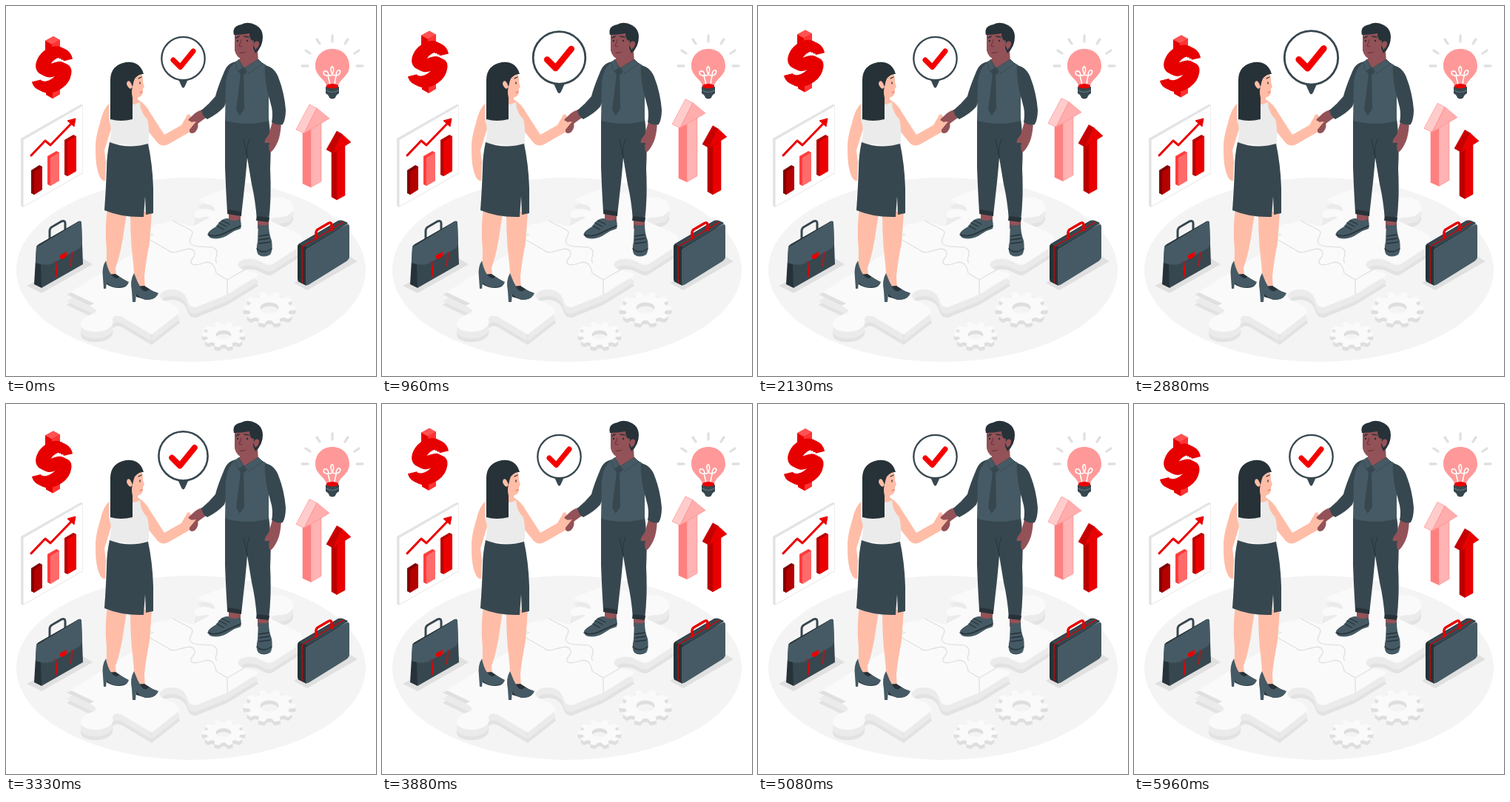
Recreate the animation shown at these times as an HTML page. Size 500 px wide and 500 px high, loop 6000 ms.

```html
<!DOCTYPE html>
<html lang="en">
<head>
<meta charset="utf-8">
<title>Business deal</title>
<style>
  html, body { margin: 0; width: 100%; height: 100%; overflow: hidden; background: #fff; }
  svg { display: block; width: 100vw; height: 100vh; }
  .line { fill: none; stroke-linecap: round; stroke-linejoin: round; }
  .dark { fill: #263238; }
  .slate { fill: #37474f; }
  .steel { fill: #455a64; }
  .skin { fill: #ffbda7; }
  .brown { fill: #935257; }
  .top { fill: #fafafa; }
  .side { fill: #e2e2e2; }
  .shade { fill: #e0e0e0; }
</style>
</head>
<body>
<svg viewBox="0 0 500 500">
  <defs>
    <path id="puzzle" d="M82 390 L128 361 L165 338 L180 328 L191 314 L200 309
      C190 303 197 293 209 294 C219 296 216 290 225 290 L252 298 L275 286
      C268 282 262 290 256 285 C251 276 266 271 277 276 C286 280 283 269 272 268 L258 262
      L299 246 L345 256 C356 262 366 256 376 260 C391 263 393 279 378 284 C365 287 357 284 359 291
      L398 309 L402 322 L360 349 C351 353 345 343 333 342 C318 340 307 349 318 355 C326 360 338 357 341 364
      L299 390 L257 407 C243 407 248 396 239 388 C229 379 207 383 208 393 C211 402 230 399 235 414
      L197 444 L163 424 C155 417 144 417 144 424 C148 437 123 445 106 437 C94 429 106 419 117 416
      C126 413 121 409 113 405 Z"/>
  </defs>

  <ellipse cx="250" cy="356.5" rx="236" ry="124.5" fill="#f4f4f4"/>

  <g id="floor">
    <use href="#puzzle" y="14" class="side"/>
    <use href="#puzzle" y="9" fill="#ebebeb"/>
    <use href="#puzzle" class="top"/>
    <path class="shade" d="M82 390 L88 387 L119 402 L113 405Z"/>
    <g class="line" stroke="#e0e0e0" stroke-width="1.3">
      <path d="M191 314 L219 330 C225 336 233 331 243 329 C253 326 259 334 252 341 C245 350 255 352 268 347 C277 344 283 351 284 361 L299 370 V390"/>
      <path d="M225 290 L250 303 C256 308 246 314 249 320 C255 329 274 323 281 327 C291 333 279 343 285 347"/>
      <path d="M299 370 L330 352 M197 444 V456"/>
    </g>
    <g id="gears"></g>
  </g>

  <g id="chart">
    <path d="M20 179 L101 133 L104 134 V226 L23 272 L20 270Z" fill="#e3e3e3"/>
    <path d="M23.500 181 L103.500 135 V225.500 L23.500 271Z" fill="#fff" stroke="#ececec" stroke-width=".6"/>
    <path class="line" d="M34 202 L53 182 L60 188 L90 157" stroke="#eb0000" stroke-width="3"/>
    <path d="M83 155 L94 152 L92 163Z" fill="#eb0000" stroke="#eb0000" stroke-linejoin="round"/>
    <path d="M34 222 L45 215 L49 217 V248 L38 255 L34 253Z" fill="#800000"/>
    <path d="M38 224 L49 217 V248 L38 255Z" fill="#b30000"/>
    <path d="M56 203 L68 196 L72 198 V236 L60 243 L56 241Z" fill="#ff3d3d"/>
    <path d="M60 205 L72 198 V236 L60 243Z" fill="#ff6b6b"/>
    <path d="M79 181 L91 174 L95 176 V223 L83 230 L79 228Z" fill="#b80000"/>
    <path d="M83 183 L95 176 V223 L83 230Z" fill="#eb0000"/>
  </g>

  <g id="satchel">
    <path class="shade" d="M28 378 L48 388 L117 349 L102 340Z"/>
    <path class="line" d="M59 315 V304 Q59 300 63 298 L75 291 Q80 289 80 294 V304" stroke="#37474f" stroke-width="3"/>
    <path class="dark" d="M41 326 Q41 324 44 322 L98 291 L102 292 L49 330 L48 381 L38 376Z"/>
    <path class="slate" d="M46 326 Q47 324 50 322 L98 291 Q102 289 102 294 L104 349 L48 381Z"/>
    <path class="steel" d="M41 326 L98 292 Q102 290 102 294 L103 321 Q102 326 97 329 L63 348 Q53 352 40 347Z"/>
    <path class="line" d="M67 345 L69 366 M89 333 L88 351" stroke="#eb0000" stroke-width="1.8"/>
    <path d="M73 337 L82 332 V338 L77 342 L73 341Z" fill="#eb0000"/>
  </g>

  <g id="briefcase">
    <path class="shade" d="M389 374 L407 384 L475 345 L462 337Z"/>
    <path class="dark" d="M394 325 Q394 322 398 320 L449 290 Q452 289 455 290 L462 293 L408 333 L406 378 L396 373 Q394 372 394 369Z"/>
    <path class="slate" d="M396 322 L449 291 Q452 289 456 291 L462 294 L407 326Z"/>
    <path class="steel" d="M405 331 Q405 328 409 326 L459 296 Q464 293 464 298 V339 Q464 342 460 345 L410 376 Q405 379 405 375Z"/>
    <path class="line" d="M400 374 V328 Q400 325 404 323 L456 292" stroke="#e00000" stroke-width="1.3"/>
    <path class="line" d="M419 314 V306 Q419 303 423 301 L435 294 Q440 291 440 296 V303" stroke="#e60000" stroke-width="3.500"/>
  </g>

  <g id="woman">
    <path class="skin" d="M137 274 H164 L158 313 Q154 338 148 354 L149 366 L135 361 Q136 344 136 330 Q133 300 137 274Z"/>
    <path class="skin" d="M168 278 H197 L194 320 Q189 345 187 365 L188 384 L174 380 Q173 352 170 330 Q168 306 168 278Z"/>
    <path class="dark" d="M136 363 L148 362 L164 373 Q166 380 153 381 Q143 381 136 376Z"/>
    <path class="steel" d="M135 344 Q129 353 131 367 L132 382 H135 L136 374 Q145 382 153 380 Q165 379 166 373 L153 366 Q149 371 142 363 Q137 355 135 344Z"/>
    <path class="dark" d="M176 379 L187 378 L204 389 Q203 397 189 397 L176 393Z"/>
    <path class="steel" d="M173 361 Q167 371 170 385 L171 400 H175 L176 389 Q184 398 192 397 Q204 395 206 388 L193 383 Q188 389 182 381 Q177 372 173 361Z"/>
    <path class="skin" d="M140 131 Q131 139 127 158 Q120 180 121 195 Q121 218 126 229 Q129 237 134 236 L135 211 L133 195 L143 163Z"/>
    <path class="skin" d="M160 118 H178 V126 Q190 134 194 143 L214 174 L237 161 Q241 153 247 147 L250 149 L246 156 L258 156 Q263 158 257 164 L247 171 L219 187 Q211 191 205 185 L187 163 L160 153Z"/>
    <path d="M139 132 Q150 126 162 130 Q171 136 181 130 Q182 145 191 153 Q195 169 192 190 L139 186 Q145 169 139 154Z" fill="#ebebeb"/>
    <path class="slate" d="M140 184 Q165 194 192 186 Q198 214 199 246 V280 L189 282 L188 257 L186 285 Q157 286 133 276 Q135 249 136 220 Q136 202 140 184Z"/>
    <path class="skin" d="M162 91 L182 89 Q186 97 185 103 L187 109 L185 112 Q186 121 180 123 Q176 125 171 123 L161 115Z"/>
    <path class="dark" d="M141 100 Q141 80 162 76 Q181 74 186 92 Q180 91 174 98 Q172 103 171 109 Q169 116 171 124 L171 153 Q155 157 141 153Z"/>
    <path class="skin" d="M171 110 Q168 99 164 102 Q161 107 168 112Z"/>
    <path class="line" d="M179 98 L183 96 M181 103 V105" stroke="#263238" stroke-width="1.3"/>
    <path class="line" d="M181 117 L184 116" stroke="#d96c62"/>
  </g>

  <g id="man">
    <path class="brown" d="M301 276 H317 V292 H301Z M340 286 H355 V301 H340Z"/>
    <path class="steel" d="M273 307 Q275 303 284 298 Q291 286 300 287 Q307 293 316 288 Q319 294 317 301 Q309 303 302 308 Q291 316 279 314 Q273 313 273 307Z"/>
    <path class="steel" d="M341 295 Q348 298 355 295 Q355 307 359 317 Q361 330 357 336 Q348 341 341 336 Q337 331 340 318Z"/>
    <path class="line" d="M273 309 Q282 313 293 308 L317 297 M339 328 Q347 336 359 328" stroke="#263238" stroke-width="1.400"/>
    <path class="line" d="M285 297 L294 302 M288 293 L298 298 M292 290 L302 295 M342 311 L355 309 M342 316 L356 314 M342 321 L357 319" stroke="#263238" stroke-width="1.300"/>
    <path class="slate" d="M296 153 L355 152 Q359 180 357 220 Q359 260 355 291 L339 289 Q337 262 332 241 L326 205 Q324 230 322 247 L318 283 L299 279 Q297 247 296 218Z"/>
    <path class="dark" d="M300 275 L318 278 V284 L299 281Z M339 284 L356 286 L355 292 L338 290Z"/>
    <path class="line" d="M326 205 L321 181 M326 205 Q324 191 329 180" stroke="#263238" stroke-width=".8"/>
    <path class="brown" d="M361 153 L372 157 Q371 176 367 184 Q362 195 357 198 Q354 192 356 185 L350 185 Q348 182 355 174Z"/>
    <path class="brown" d="M271 139 Q259 140 251 149 Q243 155 246 159 Q251 156 257 156 L248 167 Q247 174 255 171 Q261 165 259 159 L277 146Z"/>
    <path class="skin" d="M239 158 L245 147 Q249 145 249 149 L246 154 L251 157 L246 165 L239 167Z"/>
    <path class="slate" d="M312 75 Q299 76 294 91 Q286 110 283 122 Q275 132 264 141 Q266 150 272 153 Q286 146 295 136 L304 112Z"/>
    <path class="steel" d="M313 74 L340 74 Q353 78 357 87 Q360 105 355 125 V155 Q327 163 296 155 L297 105 Q298 83 313 74Z"/>
    <path class="slate" d="M350 80 Q364 83 369 99 Q376 117 378 140 Q378 153 374 160 Q366 162 359 157 Q361 147 359 137 L353 114 Q349 94 350 80Z"/>
    <path class="brown" d="M319 61 L340 60 L341 76 L323 84 L315 74Z"/>
    <path class="slate" d="M317 82 L324 84 L325 90 L321 93 L322 139 L316 148 L311 140 L317 93 L314 88Z"/>
    <path class="steel" d="M315 72 L320 84 L313 88 L310 76Z M341 72 L347 78 L328 91 L322 84Z" stroke="#37474f" stroke-width=".7"/>
    <path class="brown" d="M309 37 H339 L341 52 Q344 59 337 65 Q330 72 322 72 Q312 72 309 60Z"/>
    <path class="dark" d="M308 39 Q305 27 318 25 Q327 20 338 26 Q347 31 347 42 Q347 55 337 64 L334 57 L335 47 Q329 47 329 37 Q318 39 308 39Z"/>
    <path class="brown" d="M334 52 Q338 45 342 49 Q343 55 337 59Z"/>
    <path class="line" d="M311 43 L315 41 M322 41 L328 42" stroke="#263238" stroke-width="1.500"/>
    <circle class="dark" cx="313" cy="47" r="1.300"/><circle class="dark" cx="326" cy="47" r="1.300"/>
    <path class="line" d="M318 46 L315 54 L319 55 M316 63 Q320 64 324 62" stroke="#6e343c" stroke-width="1.100"/>
  </g>

  <g id="bulb">
    <path class="line" d="M400 81 H408 M474 81 H482 M405 60 L411 64 M477 60 L471 64 M420 45 L424 51 M462 45 L458 51 M441 40 V48" stroke="#e0e0e0" stroke-width="3.300"/>
    <path d="M441 58 C455 58 464 68 464 81 C464 94 453 97 449 107 H433 C429 97 418 94 418 81 C418 68 427 58 441 58Z" fill="#ff9999"/>
    <path class="line" d="M438 106 L435 94 C427 95 428 86 433 88 C438 91 434 95 439 94 C444 91 443 81 440.500 82 C437 84 440 94 445 94 C452 94 454 86 449 87 C445 88 447 95 445 99 L444 106" stroke="#fff" stroke-width="1.600"/>
    <path d="M433 107 Q441 103 449 107 V112 H433Z" fill="#eb0000"/>
    <path class="slate" d="M432 109 Q441 114 450 109 V118 Q446 120 445 124 Q441 127 437 124 Q436 120 432 118Z"/>
    <path class="line" d="M433 114 Q441 119 449 114" stroke="#607780" stroke-width="1.200"/>
  </g>

  <g id="dollar" class="floating">
    <path d="M53 47 L64 41 L73 46 L73 61 L62 66 L53 62Z" fill="#e60000"/>
    <path d="M53 47 L64 41 L73 46 L62 52Z" fill="#ff5252"/>
    <path d="M62 52 L73 46 V61 L62 66Z" fill="#ff3333"/>
    <path d="M54 106 L73 103 V119 L63 125 L54 120Z" fill="#e60000"/>
    <path d="M63 108 L73 103 V119 L63 125Z" fill="#ff3333"/>
    <g class="line" stroke-width="12.500" style="stroke-linecap:butt">
      <path id="curve" d="M84 73 C80 56 62 65 56 74 C48 87 55 93 64 89 C75 84 84 81 82 91 C80 104 66 111 58 111 C51 112 48 108 47 104" stroke="#e60000" transform="translate(-6 -3)"/>
      <use href="#curve" x="3" y="1.500" stroke="#eb1010"/>
      <use href="#curve" x="6" y="3" stroke="#ff3333"/>
    </g>
  </g>

  <g class="floating" stroke-width=".6" stroke-linejoin="round">
    <g stroke="#ff8585">
      <path d="M401 164 L412 168 V245 L401 240Z" fill="#ff8080"/>
      <path d="M412 165 L426 157 V237 L412 245Z" fill="#ffb3b3"/>
      <path d="M410 133 L420 138 L403 172 L392 167Z" fill="#ffcccc"/>
      <path d="M420 138 L437 152 L403 172Z" fill="#ffadad"/>
    </g>
    <g stroke="#c40000">
      <path d="M440 192 L447 196 V262 L440 258Z" fill="#b80000"/>
      <path d="M447 194 L458 188 V256 L447 262Z" fill="#eb0000"/>
      <path d="M447 169 L454 173 L442 199 L433 194Z" fill="#c70000"/>
      <path d="M454 173 L466 184 L442 199Z" fill="#eb0000"/>
    </g>
  </g>

  <g id="bubble">
    <path class="slate" d="M233 99 H246 L241.500 109 Q239.500 112.500 237.500 109Z"/>
    <circle cx="239.500" cy="71" r="29.200" fill="#fff" stroke="#37474f" stroke-width="2.300"/>
    <path class="line" d="M226 73 L235.500 82.500 L253 61" stroke="#f50000" stroke-width="7"/>
  </g>
</svg>
<script>
const LOOP = 6000, FLOAT = 1500, RISE = 10;
const BEATS = [[0, 1], [.1, 1.3], [.3, 1], [.4, 1], [.5, 1.3], [.6, 1], [1, 1]];
const bubble = document.getElementById('bubble');
const floaters = document.querySelectorAll('.floating');

// Isometric gear: each tooth is a raised section of a squashed circle
function gear(cx, cy, rx, ry, teeth) {
  const at = (turn, r) => {
    const a = turn * 2 * Math.PI;
    return `${(cx + rx * r * Math.cos(a)).toFixed(1)} ${(cy + ry * r * Math.sin(a)).toFixed(1)}`;
  };
  const points = [];
  for (let i = 0; i < teeth; i++) {
    for (const [offset, r] of [[-.3, .78], [-.19, 1], [.19, 1], [.3, .78]]) {
      points.push(at((i + offset) / teeth, r));
    }
  }
  const hole = [];
  for (let i = 0; i < 24; i++) hole.push(at(i / 24, .37));
  const d = `M${points.join('L')}ZM${hole.join('L')}Z`;
  const layer = (y, fill) =>
    `<path d="${d}" transform="translate(0 ${y})" fill="${fill}" fill-rule="evenodd" stroke="${fill}" stroke-linejoin="round"/>`;
  return layer(5, '#dedede') + layer(2.5, '#dedede') + layer(0, '#fafafa');
}

document.getElementById('gears').innerHTML =
  gear(294, 444, 29, 17, 10) + gear(356, 408, 35, 21.5, 10);

function keyed(frames, p) {
  const i = frames.findIndex(([at]) => at > p);
  const [a, from] = frames[i - 1], [b, to] = frames[i];
  return from + (to - from) * (p - a) / (b - a);
}

function draw(ms) {
  const t = ms % LOOP;
  const phase = t % FLOAT / FLOAT;
  const lift = RISE * (1 - Math.abs(1 - 2 * phase));
  floaters.forEach(g => g.setAttribute('transform', `translate(0 ${-lift})`));
  const scale = keyed(BEATS, t / LOOP);
  bubble.setAttribute('transform', `translate(239.5 75.7) scale(${scale}) translate(-239.5 -75.7)`);
}

const start = performance.now();
function tick() {
  draw(performance.now() - start);
  requestAnimationFrame(tick);
}
tick();
</script>
</body>
</html>
```
